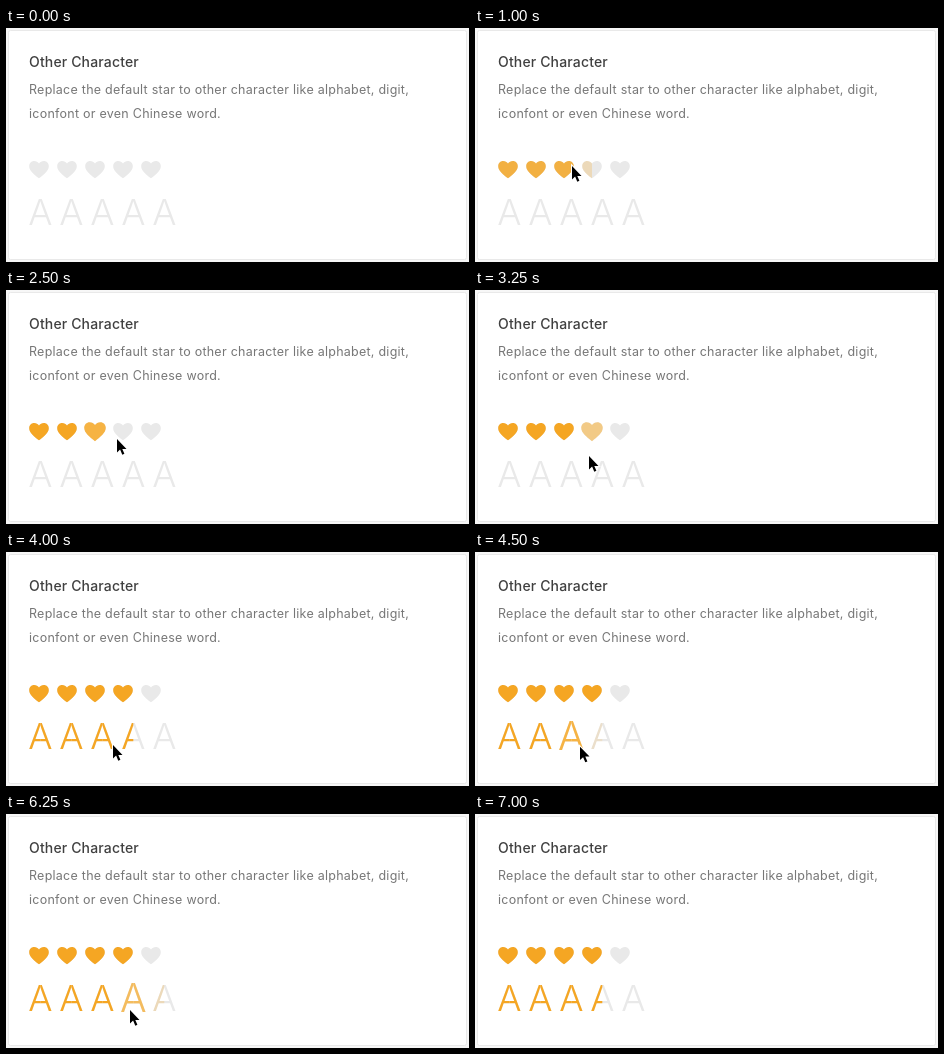
These frames come from a looping animation (463x234 px, 7250 ms). An HTML page:

```html
<!DOCTYPE html>
<html lang="en">
<head>
<meta charset="utf-8">
<title>Other Character</title>
<style>
  html, body { margin: 0; width: 100%; height: 100%; overflow: hidden; background: #f7f7f7; }
  svg { display: block; }
  text { font-family: Inter, "Open Sans", sans-serif; }
  .title { font-size: 14px; font-weight: 500; letter-spacing: 0.15px; fill: #404040; }
  .note { font-size: 12.5px; letter-spacing: 0.25px; fill: #777; }
  .letter { font-size: 36px; font-weight: 350; text-anchor: middle; }
  .off { fill: #e9e9e9; }
  .on { fill: #f5a623; }
</style>
</head>
<body>
<svg width="463" height="234" viewBox="0 0 463 234">
  <defs>
    <clipPath id="left"><path d="M-20-20H0V20H-20Z"/></clipPath>
    <clipPath id="right"><path d="M0-20H20V20H0Z"/></clipPath>
    <path id="heart" d="M0 8.8C-5 5-9.8 1.3-9.8-3.3C-9.8-6.3-7.6-8.5-4.9-8.5C-2.8-8.5-1-7.5 0-5.9C1-7.5 2.8-8.5 4.9-8.5C7.6-8.5 9.8-6.3 9.8-3.3C9.8 1.3 5 5 0 8.8Z"/>
    <text id="letter" class="letter" y="13">A</text>
  </defs>
  <rect x="2.5" y="2.5" width="458" height="229" rx="2" fill="#fff" stroke="#e9e9e9"/>
  <text class="title" x="23" y="39">Other Character</text>
  <text class="note" x="23" y="66">Replace the default star to other character like alphabet, digit,</text>
  <text class="note" x="23" y="90">iconfont or even Chinese word.</text>
  <g id="rows"></g>
  <path id="cursor" d="M0 0V13.4L3.1 10.6L5.3 15.7L7.4 14.8L5.3 9.9H9.5Z" fill="#000" stroke="#fff" stroke-width="2" paint-order="stroke"/>
</svg>
<script>
const STEP = 250, STEPS = 29, EASE = 0.6;
const svgNS = 'http://www.w3.org/2000/svg';
const cursor = document.getElementById('cursor');

// Pointer path: step, x, y
const path = [[1, 236, 102], [2, 108, 142], [4, 97, 138], [8, 89, 140], [10, 111, 149],
  [12, 118, 145], [13, 114, 166], [15, 115, 188], [16, 107, 193], [22, 101, 198],
  [23, 150, 198], [25, 124, 196]];

const rows = [
  { shape: 'heart', x: 33, y: 141.5, gap: 28, top: 130, bottom: 147 },
  { shape: 'letter', x: 34.3, y: 183.8, gap: 31, top: 162, bottom: 202 }
];

function add(parent, tag, attrs = {}) {
  const el = document.createElementNS(svgNS, tag);
  for (const key in attrs) el.setAttribute(key, attrs[key]);
  return parent.appendChild(el);
}

function pointer(step) {
  const next = path.findIndex(p => p[0] >= step);
  if (next < 0) return path[path.length - 1].slice(1);
  const b = path[next], a = path[Math.max(0, next - 1)];
  const k = a === b ? 0 : (step - a[0]) / (b[0] - a[0]);
  return [1, 2].map(n => a[n] + (b[n] - a[n]) * k);
}

// Which item the pointer rates, and whether it enlarges
function hit(row, [x, y]) {
  const item = Math.round((x - row.x) / row.gap);
  if (y < row.top || y >= row.bottom || item < 0 || item > 4) return null;
  const offset = x - row.x - item * row.gap;
  const whole = offset >= 0;
  return { value: item + (whole ? 1 : 0.5), big: whole && offset < 12 ? item : -1 };
}

// The rating follows the pointer one step late; each half eases to its state
function simulate(row) {
  let value = 0, levels = Array(10).fill(0);
  row.states = [];
  for (let s = 0; s < STEPS; s++) {
    const over = s > 1 ? hit(row, pointer(s - 1)) : null;
    if (over) value = over.value;
    levels = levels.map((a, h) => a + ((h < value * 2 ? 1 : 0) - a) * EASE);
    row.states.push({ levels, big: over ? over.big : -1 });
  }
}

function build(row) {
  const href = '#' + row.shape;
  row.items = Array.from({ length: 5 }, (_, i) => {
    const g = add(document.getElementById('rows'), 'g');
    add(g, 'use', { href, class: 'off' });
    const halves = ['left', 'right'].map(side =>
      add(add(g, 'g', { 'clip-path': `url(#${side})` }), 'use', { href, class: 'on' }));
    return { g, halves, x: row.x + i * row.gap };
  });
}

function drawRow(row, step) {
  const { levels, big } = row.states[step];
  row.items.forEach(({ g, halves, x }, i) => {
    g.setAttribute('transform', `translate(${x} ${row.y}) scale(${big === i ? 1.1 : 1})`);
    g.setAttribute('opacity', big === i ? 0.85 : 1);
    halves.forEach((half, side) => {
      const a = levels[i * 2 + side];
      half.setAttribute('opacity', a < 0.07 ? 0 : a > 0.93 ? 1 : a);
    });
  });
}

function frame() {
  const step = Math.floor(performance.now() / STEP) % STEPS;
  rows.forEach(row => drawRow(row, step));
  cursor.setAttribute('visibility', step > 0 && step < STEPS - 1 ? 'visible' : 'hidden');
  cursor.setAttribute('transform', `translate(${pointer(step)})`);
  requestAnimationFrame(frame);
}

rows.forEach(row => { build(row); simulate(row); });
frame();
</script>
</body>
</html>
```
